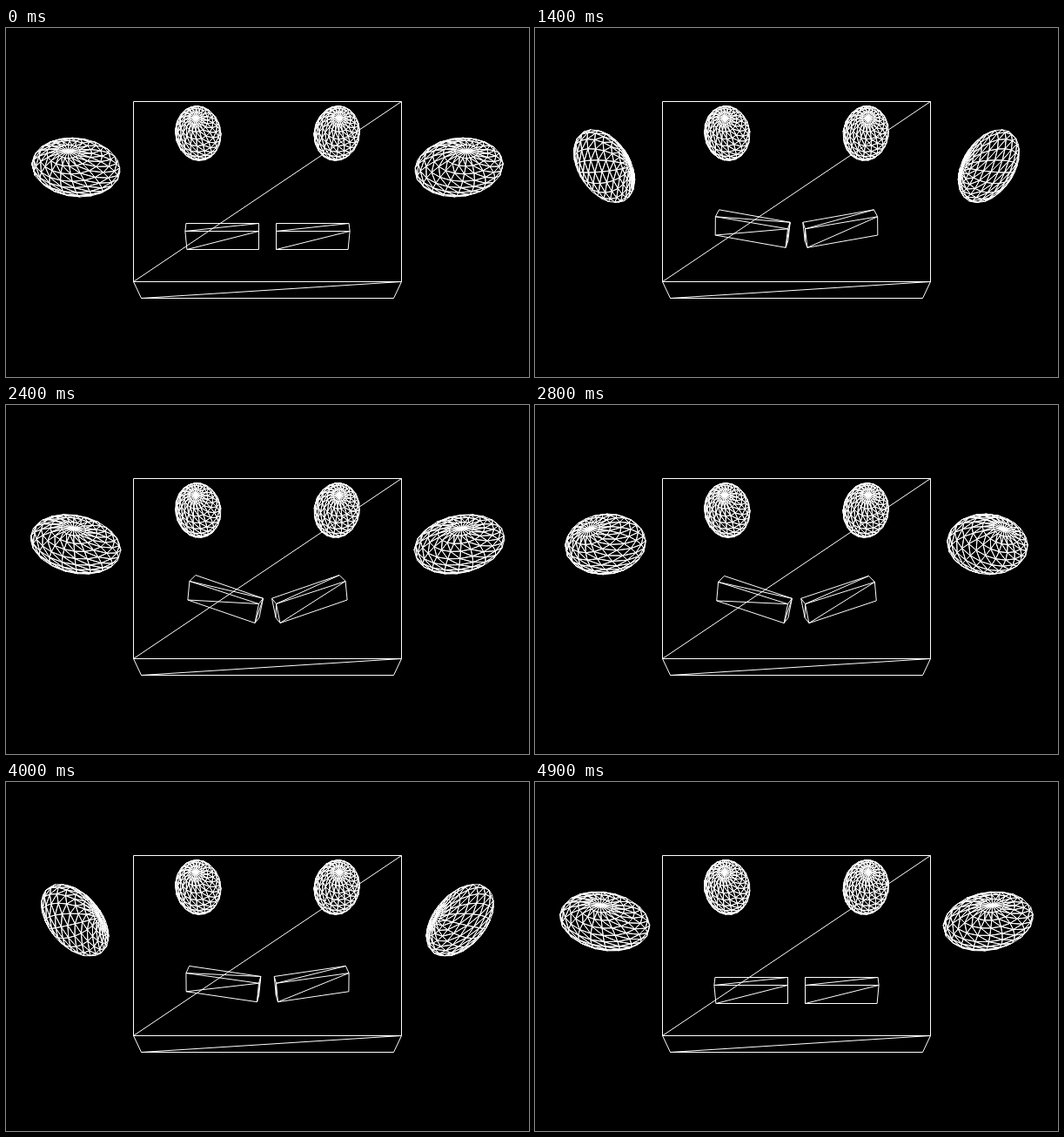
Write an HTML page with a canvas that moves like this. It is 601 by 401 pixels and loops after 5 s.

```html
<!DOCTYPE html>
<html lang="en">
<head>
<meta charset="utf-8">
<title>Wireframe face</title>
<style>
  html, body { margin: 0; width: 100%; height: 100%; overflow: hidden; background: #000; }
  canvas { display: block; }
</style>
</head>
<body>
<canvas id="stage" width="601" height="401"></canvas>
<script>
const ctx = document.getElementById('stage').getContext('2d');
const LOOP = 5000, STEP = 100, STEPS = 49;
const CX = 300, VANISH_Y = 617, FOCAL = 735;
const GORES = 20, RINGS = 12;
const TURN = 2 * Math.PI / STEPS;

// Mouth lift over the steps: [step, amount]
const LIFT = [[0, 0], [6, .285], [13, .54], [23, 1], [25, 1.05], [32, .77], [39, .45], [48, 0]];

function liftAt(step) {
  const i = Math.max(1, LIFT.findIndex(([s]) => s >= step));
  const [s0, a] = LIFT[i - 1], [s1, b] = LIFT[i];
  return a + (b - a) * (step - s0) / (s1 - s0);
}

function line(...points) {
  points.forEach(([x, y], i) => i ? ctx.lineTo(x, y) : ctx.moveTo(x, y));
}

function loop(...points) {
  line(...points);
  ctx.closePath();
}

// Unit sphere with its pole on the y axis
const sphere = [];
for (let j = 0; j <= RINGS; j++) {
  const theta = j / RINGS * Math.PI;
  for (let i = 0; i <= GORES; i++) {
    const phi = i / GORES * 2 * Math.PI;
    sphere.push([-Math.cos(phi) * Math.sin(theta), Math.cos(theta), Math.sin(phi) * Math.sin(theta)]);
  }
}

const triangles = [];
for (let j = 0; j < RINGS; j++) {
  for (let i = 0; i < GORES; i++) {
    const b = j * (GORES + 1) + i, a = b + 1;
    const c = b + GORES + 1, d = c + 1;
    if (j > 0) triangles.push([a, b, d]);
    if (j < RINGS - 1) triangles.push([b, c, d]);
  }
}

// x runs right, y towards the viewer, z down the screen
function ellipsoid(cx, cy, [rx, ry, rz], spin, roll) {
  const cs = Math.cos(spin), ss = Math.sin(spin);
  const cr = Math.cos(roll), sr = Math.sin(roll);
  const pts = sphere.map(([x, y, z]) => {
    const px = (x * cs + z * ss) * rx, py = y * ry, pz = (z * cs - x * ss) * rz;
    const k = FOCAL / (FOCAL - (px * sr + py * cr));
    return [CX + (cx - CX + px * cr - py * sr) * k, VANISH_Y + (cy - VANISH_Y + pz) * k];
  });
  ctx.beginPath();
  for (const [a, b, c] of triangles) {
    const p = pts[a], q = pts[b], r = pts[c];
    const area = (q[0] - p[0]) * (r[1] - p[1]) - (q[1] - p[1]) * (r[0] - p[0]);
    if (area < 0) loop(p, q, r);
  }
  ctx.stroke();
}

function head() {
  const tl = [146, 84], tr = [454, 84], br = [454, 291], bl = [146, 291];
  const lowL = [155, 310], lowR = [445, 310];
  ctx.beginPath();
  loop(tl, tr, br, bl);
  line(bl, tr);
  line(bl, lowL, lowR, br);
  line(lowL, br);
  ctx.stroke();
}

function mouth(s, mirrored) {
  const at = (x, y) => [mirrored ? 2 * CX - x : x, y];
  const ox = 205.4 + 5 * s * s, oy = 233 - 31 * s;
  const ix = 290, iy = 233 - 5 * s;
  const outer = at(ox, oy), inner = at(ix, iy);
  const outerLow = at(ox + 2 - 4 * s, oy + 21 + .5 * s);
  const innerLow = at(ix - 4.5 * s, iy + 21 + s);
  const outerBack = at(ox + 1 + 6 * s, oy - 9 + 2 * s);
  const innerBack = at(ix + 5 * s, iy - 9 + 2.7 * s);
  const innerBackLow = at(ix + .5 * s, iy + 12 + 3.7 * s);
  ctx.beginPath();
  loop(outer, inner, innerLow, outerLow);
  line(outer, outerBack, innerBack, inner);
  if (mirrored) {
    line(innerLow, outer);
    line(inner, outerBack);
  } else {
    line(outerLow, inner);
    line(outer, innerBack);
  }
  if (s > 0) {
    line(innerBack, innerBackLow, innerLow);
    if (mirrored) line(innerBackLow, inner);
    else line(innerLow, innerBack);
  }
  ctx.stroke();
}

function draw(step) {
  ctx.setTransform(1, 0, 0, 1, 0, 0);
  ctx.fillStyle = '#000';
  ctx.fillRect(0, 0, 601, 401);
  ctx.translate(.5, .5);
  ctx.strokeStyle = '#fff';
  ctx.lineWidth = 1;
  ctx.lineJoin = 'bevel';

  head();
  const angle = step * TURN, lift = liftAt(step);
  for (const side of [-1, 1]) {
    ellipsoid(CX + side * 219.7, 160.3, [49.9, 30, 28.3], 0, -side * angle);
    ellipsoid(CX + side * 79.6, 121.1, [26.1, 26.1, 26.1], -side * angle, 0);
    mouth(lift, side > 0);
  }
}

const start = performance.now();
let shown = -1;

function tick() {
  const time = (performance.now() - start) % LOOP;
  const step = Math.max(0, Math.floor(time / STEP) - 1);
  if (step !== shown) draw(shown = step);
  requestAnimationFrame(tick);
}
tick();
</script>
</body>
</html>
```
